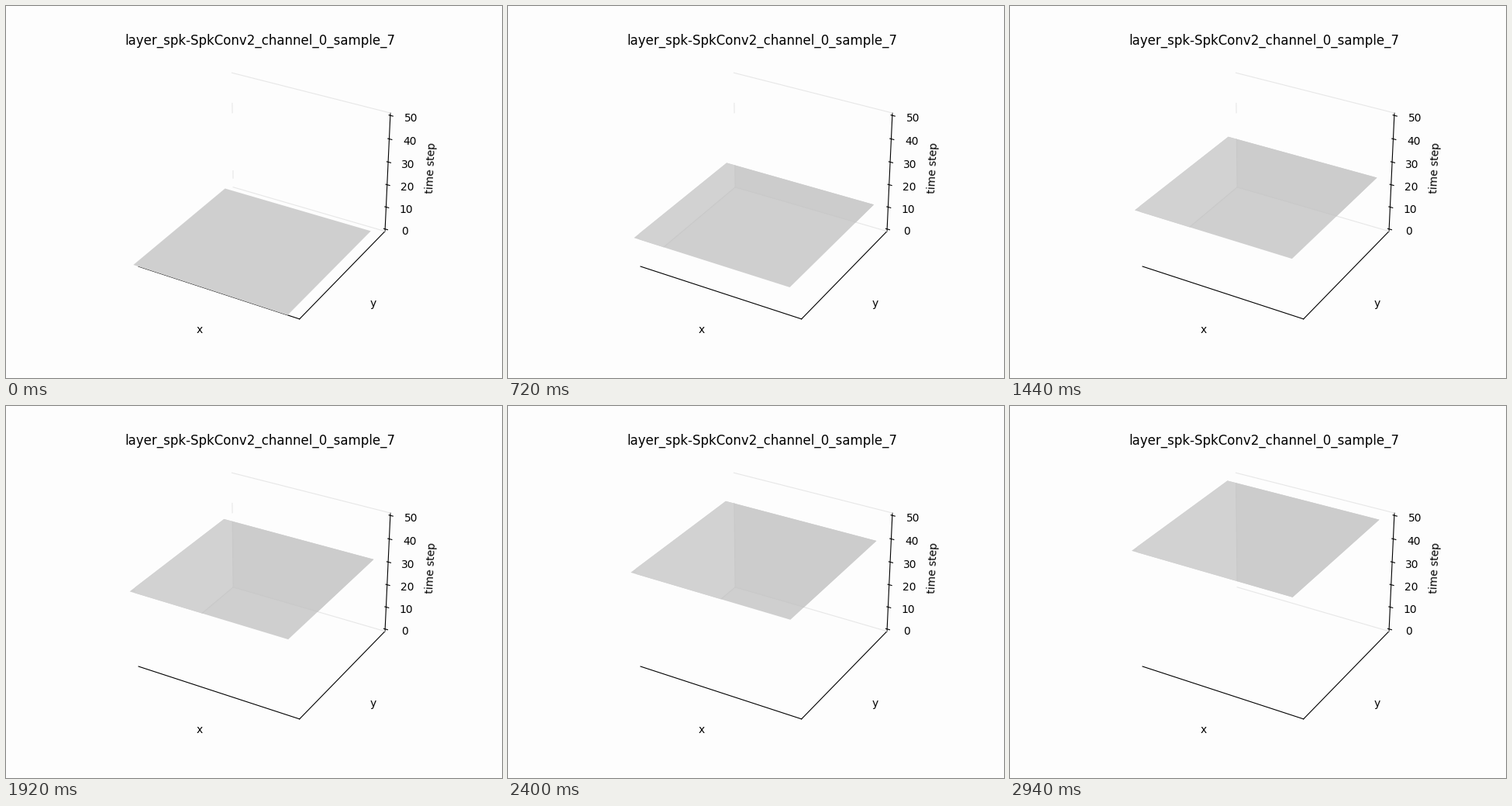
These frames come from a looping animation (640x480 px, 3 s). A matplotlib script:

```python
import matplotlib.pyplot as plt
from matplotlib.animation import FuncAnimation
from matplotlib.path import Path
from mpl_toolkits.mplot3d import proj3d
from mpl_toolkits.mplot3d.art3d import Poly3DCollection

STEPS, INTERVAL = 50, 60
SIZE = 12
PAPER = "#fdfdfd"
FLOOR, LEFT, RIGHT = "#cfcfcf", "#d2d2d2", "#cccccc"
EDGE, SHADED_EDGE = "#e7e7e7", "#c9c9c9"

# Box limits: the data range plus 1/48 on each side
x0, x1 = -SIZE / 48, SIZE * 49 / 48
z0, z1 = -STEPS / 48, STEPS * 49 / 48

fig = plt.figure(figsize=(6.4, 4.8), dpi=100, facecolor=PAPER)
ax = fig.add_subplot(projection="3d", computed_zorder=False)
ax.set_facecolor(PAPER)
ax.set_title("layer_spk-SpkConv2_channel_0_sample_7")
ax.set(xlabel="x", ylabel="y", zlabel="time step")
ax.grid(False)
for axis in (ax.xaxis, ax.yaxis, ax.zaxis):
    axis.set_pane_color((1, 1, 1, 0))


def line(a, b, color, zorder):
    return ax.plot(*zip(a, b), color=color, lw=0.8, zorder=zorder)[0]


back = (x0, x1, z0)
back_top = (x0, x1, z1)

# Visible parts of the box edges
line(back, (x1, x1, z0), EDGE, 1)
line(back_top, (x1, x1, z1), EDGE, 1)
for low, high in ((3.2, 6.7), (33.3, 37.6)):
    line((x0, x1, low), (x0, x1, high), EDGE, 1)

# Box edges seen through the sheet
inner = [line(back, end, SHADED_EDGE, 4)
         for end in ((x1, x1, z0), (x0, x0, z0), back_top)]

ax.set(xlim=(x0, x1), ylim=(x0, x1), zlim=(z0, z1))
ax.set_xticks([])
ax.set_yticks([])
ax.set_zticks(range(0, STEPS + 1, 10))


def outline(points):
    """Closed 2D path of projected 3D points."""
    x, y, _ = proj3d.proj_transform(*zip(*points), ax.get_proj())
    return Path(list(zip(x, y)) + [(x[0], y[0])])


def sheet(step):
    a, b = -0.5, SIZE - 0.5
    return [(a, a, step), (b, a, step), (b, b, step), (a, b, step)]


def add_sheet(color, zorder, wall=None):
    poly = Poly3DCollection([sheet(0)], facecolor=color, edgecolor="none",
                            linewidth=0, zorder=zorder)
    ax.add_collection3d(poly)
    if wall:
        poly.set_clip_path(outline(wall), ax.transData)
    return poly


left_wall = [(x0, x0, z0), back, back_top, (x0, x0, z1)]
right_wall = [back, (x1, x1, z0), (x1, x1, z1), back_top]
base = add_sheet(FLOOR, 2)
tints = [add_sheet(LEFT, 3, left_wall), add_sheet(RIGHT, 3, right_wall)]


def update(step):
    corners = sheet(step)
    clip = outline(corners)
    for poly in (base, *tints):
        poly.set_verts([corners])
    for edge in inner:
        edge.set_clip_path(clip, ax.transData)
    # Lying on the floor, the sheet has one flat tone
    for part in (*tints, *inner):
        part.set_visible(step > 0)
    return base, *tints, *inner


anim = FuncAnimation(fig, update, frames=STEPS, interval=INTERVAL,
                     repeat=True, repeat_delay=0, blit=False)
plt.show()
```
